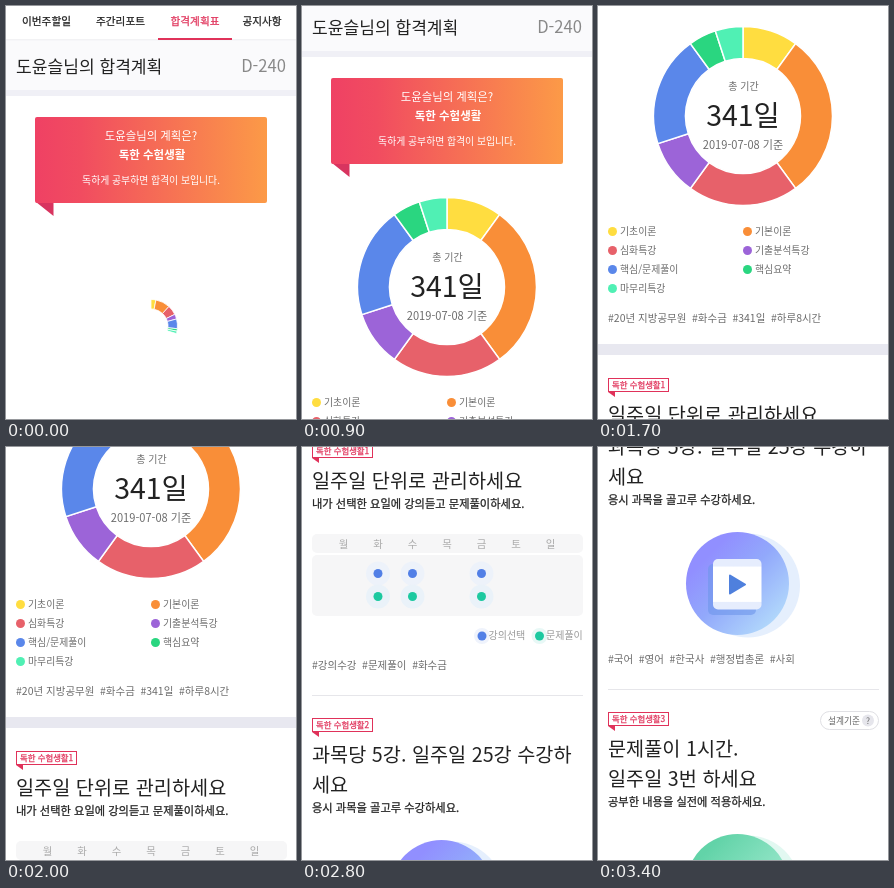
An HTML page for the animation above (3.6 s loop, 290 px wide and 413 px high).

```html
<!DOCTYPE html>
<html lang="ko">
<head>
<meta charset="utf-8">
<title>합격계획</title>
<style>
html, body { margin: 0; width: 100%; height: 100%; overflow: hidden; background: #fff; }
svg { display: block; width: 290px; height: 413px; }
text { font-family: "Noto Sans CJK KR", "Noto Sans KR", "Noto Sans CJK", "Noto Sans CJK JP", sans-serif; white-space: pre; }
</style>
</head>
<body>
<svg id="stage" viewBox="0 0 290 413">
  <defs>
    <linearGradient id="warm"><stop offset="0" stop-color="#ef4164"/><stop offset=".2" stop-color="#f14c60"/><stop offset="1" stop-color="#fc9a47"/></linearGradient>
    <linearGradient id="violet" x1=".1" y1=".1" x2=".9" y2=".9"><stop offset=".15" stop-color="#918fff"/><stop offset=".5" stop-color="#92a9fb"/><stop offset="1" stop-color="#b4dcfb"/></linearGradient>
    <linearGradient id="mint" x1=".1" y1=".1" x2=".9" y2=".9"><stop offset=".1" stop-color="#62d3a8"/><stop offset="1" stop-color="#b0f0da"/></linearGradient>
    <linearGradient id="card" x1="0" y1="0" x2="0" y2="1"><stop offset=".14" stop-color="#e6edfd"/><stop offset=".16" stop-color="#fff"/><stop offset=".84" stop-color="#fff"/><stop offset=".86" stop-color="#e6edfd"/></linearGradient>
  </defs>
  <g id="page"></g>
</svg>
<script>
const LOOP = 3600, STEP = 100, LAST_STEP = 3400;
const RED = '#e0325a', BLUE = '#517fe6', GREEN = '#1cc9a0', INK = '#222', GREY = '#6c6c6c', PALE = '#f6f6f7';
const page = document.getElementById('page');

function add(tag, attrs, parent = page) {
  const el = document.createElementNS('http://www.w3.org/2000/svg', tag);
  for (const key in attrs) el.setAttribute(key, attrs[key]);
  parent.append(el);
  return el;
}

const rect = (x, y, width, height, fill, rx = 0) => add('rect', { x, y, width, height, fill, rx });
const circle = (cx, cy, r, fill) => add('circle', { cx, cy, r, fill });
const path = (d, fill, more) => add('path', { d, fill, ...more });

// y is the visual middle of the line
function text(str, x, y, size, fill, more = {}, parent = page) {
  const el = add('text', { x, y: y + size * .37, 'font-size': size, fill, ...more }, parent);
  el.textContent = str;
  return el;
}
const MID = { 'text-anchor': 'middle' }, END = { 'text-anchor': 'end' };
// a hairline outline stands in for medium weight
const medium = color => ({ stroke: color, 'stroke-width': .25 });

function tags(words, y) {
  const el = text('', 10, y, 10.5, GREY);
  words.forEach((word, i) => {
    const span = add('tspan', i ? { dx: 5.6 } : {}, el);
    span.textContent = '#' + word;
  });
}

function badge(n, y) {
  add('rect', { x: 10.5, y: y + .5, width: 60, height: 13, fill: '#fff', stroke: RED });
  path(`M10 ${y + 14}h7v5z`, RED);
  text('독한 수험생활' + n, 14, y + 7, 8.4, RED, medium(RED));
}

function section(n, y, lines, sub) {
  badge(n, y);
  lines.forEach((line, i) => text(line, 10, y + 37 + i * 30, 19.7, INK));
  text(sub, 10, y + 60 + (lines.length - 1) * 30, 11.25, INK, medium(INK));
}

function disc(y, fill, shade) {
  circle(150, y + 2, 52, shade);
  circle(139.5, y, 51.5, fill);
}

// header
[['이번주할일', 40.5], ['주간리포트', 114.5], ['합격계획표', 189], ['공지사항', 256]].forEach(([name, x], i) => {
  const color = i === 2 ? RED : INK;
  text(name, x, 15, 10.65, color, { ...MID, ...medium(color) });
});
rect(0, 34, 290, 50, '#fafafc');
rect(0, 33.5, 290, .7, '#e6e6ea');
rect(152, 32, 74, 2, RED);
text('도윤슬님의 합격계획', 10, 61, 17.1, INK);
text('D-240', 280, 60, 16.6, '#888', END);
rect(0, 84, 290, 6, '#f0f0f6');

// banner
path('M30 196h17.5v14z', '#d8345f');
rect(29, 111, 232, 86, 'url(#warm)', 2);
text('도윤슬님의 계획은?', 145, 130, 11.4, '#fff', MID);
text('독한 수험생활', 146, 149, 11.5, '#fff', { ...MID, 'font-weight': 700 });
text('독하게 공부하면 합격이 보입니다.', 145, 174.5, 9.85, '#fff', MID);

// doughnut and its legend
const parts = [
  ['기초이론', .10, '#ffdd40'],
  ['기본이론', .30, '#f98e38'],
  ['심화특강', .20, '#e7616a'],
  ['기출분석특강', .10, '#9c64d8'],
  ['핵심/문제풀이', .20, '#5a87ea'],
  ['핵심요약', .05, '#2ad680'],
  ['마무리특강', .05, '#50f0b4']
];
const slices = parts.map(([name, share, color], i) => {
  const x = i % 2 ? 149.5 : 14.5, y = 435.5 + 19 * (i >> 1);
  circle(x, y, 4.5, color);
  text(name, x + 7.5, y, 9.9, GREY);
  return path('', color, { stroke: '#fff', 'stroke-width': 1.5 });
});
const total = add('g', {});
text('총 기간', 145.5, 290, 10, GREY, MID, total);
text('341일', 145, 319.5, 28.5, INK, MID, total);
text('2019-07-08 기준', 145, 348.5, 11.1, GREY, MID, total);
tags(['20년 지방공무원', '화수금', '341일', '하루8시간'], 522);
rect(0, 548, 290, 11, '#e8e8f0');

// weekly table
section(1, 582, ['일주일 단위로 관리하세요'], '내가 선택한 요일에 강의듣고 문제풀이하세요.');
rect(10, 672, 271, 19, PALE, 5);
rect(10, 693, 271, 61, PALE, 5);
[...'월화수목금토일'].forEach((day, i) => text(day, 41.5 + 34.5 * i, 682, 10.4, '#aaa', MID));
for (const x of [76, 110.5, 179.5]) {
  circle(x, 711.5, 12, '#edf2fa');
  circle(x, 734.5, 12, '#eaf2f9');
  circle(x, 711.5, 4.5, BLUE);
  circle(x, 734.5, 4.5, GREEN);
}
[['강의선택', 180, BLUE, '#eff3fc'], ['문제풀이', 237.5, GREEN, '#e8f8f6']].forEach(([name, x, color, halo]) => {
  circle(x, 774, 8, halo);
  circle(x, 774, 4.5, color);
  text(name, x + 6.5, 773.5, 10, '#999');
});
tags(['강의수강', '문제풀이', '화수금'], 803);

// lectures
rect(10, 833, 271, 1, '#e6e6ea');
section(2, 856, ['과목당 5강. 일주일 25강 수강하', '세요'], '응시 과목을 골고루 수강하세요.');
disc(1029.5, 'url(#violet)', '#e5effd');
rect(110, 1010, 48, 51, '#6f97ec', 5).setAttribute('opacity', .6);
rect(115, 1005, 48.5, 50.5, 'url(#card)', 5);
path('M132 1021.5L147 1030.5L132 1039.5Z', '#4f80dd', { stroke: '#4f80dd', 'stroke-width': 2, 'stroke-linejoin': 'round' });
tags(['국어', '영어', '한국사', '행정법총론', '사회'], 1105);

// exercises
rect(10, 1135, 271, 1, '#e6e6ea');
section(3, 1158, ['문제풀이 1시간.', '일주일 3번 하세요'], '공부한 내용을 실전에 적용하세요.');
add('rect', { x: 222.5, y: 1157.5, width: 58, height: 18, rx: 9, fill: '#fff', stroke: '#e0e0e4' });
text('설계기준', 230, 1166.5, 8.7, '#666');
circle(270, 1166.5, 6, '#e6e6ec');
text('?', 270, 1166.5, 8.5, '#666', MID);
disc(1331.5, 'url(#mint)', '#e2f8f1');

function drawDoughnut(p) {
  const cx = 145, cy = 320, outer = 89.5 * p, inner = 57.5 * p;
  const at = (r, a) => `${cx + r * Math.sin(a)} ${cy - r * Math.cos(a)}`;
  let from = 0;
  parts.forEach(([, share], i) => {
    const to = from + share * p * 2 * Math.PI;
    slices[i].setAttribute('d', `M${at(outer, from)}A${outer} ${outer} 0 0 1 ${at(outer, to)}` +
      `L${at(inner, to)}A${inner} ${inner} 0 0 0 ${at(inner, from)}Z`);
    slices[i].setAttribute('stroke-width', .5 + p);
    from = to;
  });
}

// [time, scroll offset], joined by a smooth curve
const stops = [[600, 0], [900, 39], [1400, 150], [2000, 278], [2400, 420], [3100, 720], [3400, 893]];

function slope(i) {
  if (!i) return 0;
  const [t0, y0] = stops[i - 1], [t1, y1] = stops[Math.min(i + 1, stops.length - 1)];
  return (y1 - y0) / (t1 - t0);
}

function scrollAt(t) {
  if (t <= stops[0][0]) return 0;
  const i = stops.findIndex(s => s[0] >= t) - 1;
  const [t0, y0] = stops[i], [t1, y1] = stops[i + 1];
  const d = t1 - t0, u = (t - t0) / d, v = 1 - u;
  return Math.round(v * v * (1 + 2 * u) * y0 + u * u * (1 + 2 * v) * y1 +
    d * u * v * (v * slope(i) - u * slope(i + 1)));
}

function draw(time) {
  const t = Math.min(Math.floor((time % LOOP) / STEP) * STEP, LAST_STEP);
  const grow = Math.min((t + 84) / 1000, 1);
  drawDoughnut(1 - (1 - grow) ** 4);
  total.setAttribute('visibility', t >= 400 ? 'visible' : 'hidden');
  page.setAttribute('transform', `translate(0 ${-scrollAt(t)})`);
}

const start = performance.now();
function tick() {
  draw(performance.now() - start);
  requestAnimationFrame(tick);
}
tick();
</script>
</body>
</html>
```
